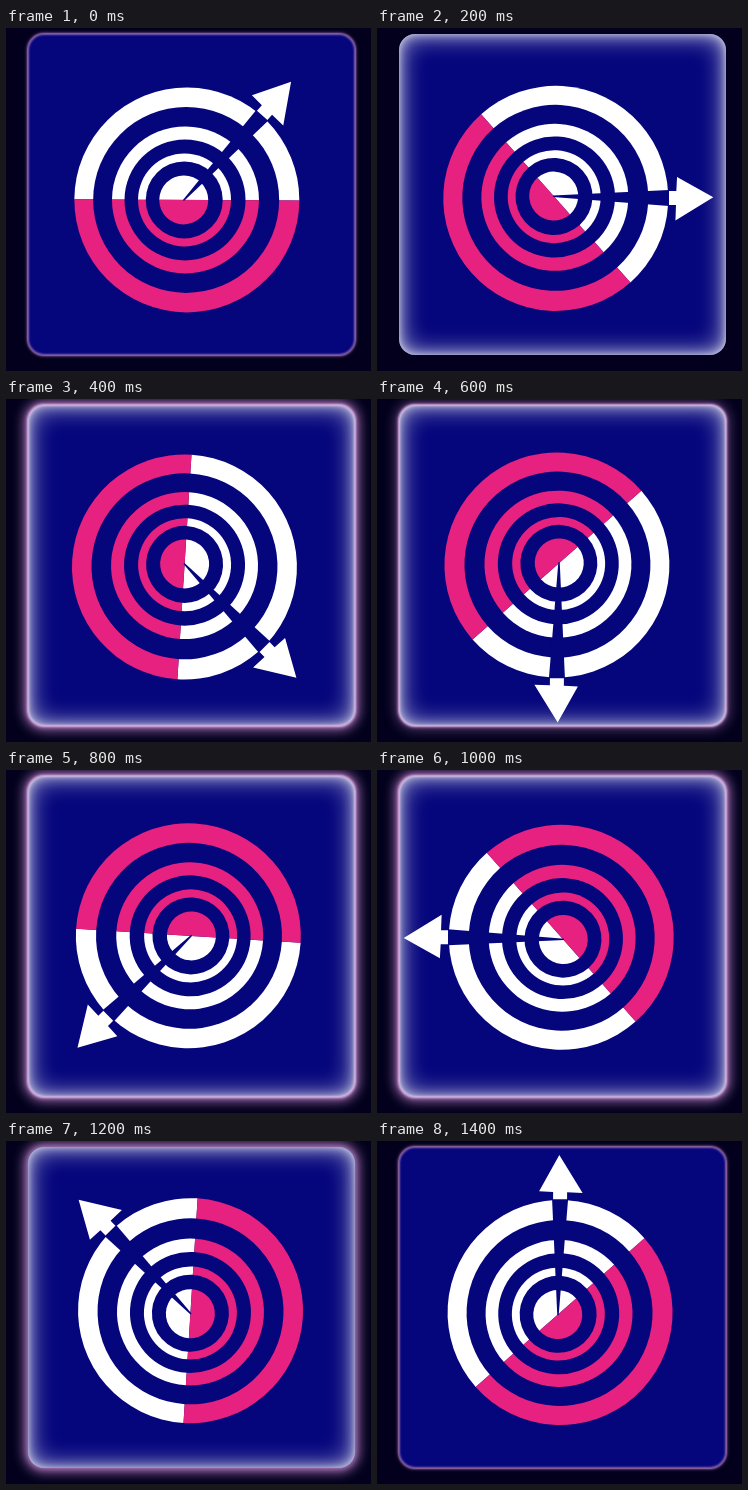
An HTML page with a canvas that plays this animation: 365 px wide and 343 px high, repeating every 1600 ms.

```html
<!DOCTYPE html>
<html lang="en">
<head>
<meta charset="utf-8">
<title>Spinning target</title>
<style>
  html, body { margin: 0; width: 100%; height: 100%; overflow: hidden; background: #02001c; }
  #card {
    position: absolute; left: 22px; top: 6px; width: 327px; height: 321px;
    border-radius: 16px; background: #05057c;
  }
  canvas { position: absolute; left: 0; top: 0; }
</style>
</head>
<body>
<div id="card"></div>
<canvas id="stage" width="365" height="343"></canvas>
<script>
const card = document.getElementById('card');
const ctx = document.getElementById('stage').getContext('2d');

const STEP = 200, STEPS = 8;
const NAVY = '#05057c', PINK = '#e6217f', WHITE = '#fff';
const RADII = [112.5, 93, 73.5, 60.5, 46.5, 38.5, 24.5];

const rad = deg => deg * Math.PI / 180;
const within = (i, first, last) => Number(i >= first && i <= last);

// An eighth of a turn per step, with a small overshoot that settles at once
const turnAt = i => 360 / STEPS * i + 3.3 * (1 - 0.05 ** i);

// The border blinks off, the inner glow holds, the outer glow flickers once
const lightAt = i => ({
  line: Number(i % 5 !== 1),
  inner: within(i, 1, 6),
  outer: within(i, 2, 6) * (i === 3 ? 0.5 : 1)
});

function polygon(color, points) {
  ctx.fillStyle = color;
  ctx.beginPath();
  points.forEach(([x, y]) => ctx.lineTo(x, y));
  ctx.fill();
}

// Smaller circles sit a little further off the pivot
function sector(color, r, from, sweep) {
  ctx.fillStyle = color;
  ctx.beginPath();
  ctx.arc(0.035 * r - 4.6, 3.1, r, rad(from), rad(from + sweep));
  ctx.fill();
}

function drawArrow() {
  polygon(NAVY, [[-5.5, -1.2], [110.5, -7], [118, -7], [118, 9], [110.5, 9], [-5.5, 0.2]]);
  polygon(WHITE, [
    [154.8, 0], [118.5, -20], [117.8, -6], [110.5, -6],
    [110.5, 8], [117.5, 8], [117, 23.5]
  ]);
}

function drawTarget(turn) {
  ctx.clearRect(0, 0, 365, 343);
  ctx.save();
  ctx.translate(181.5, 168.8);
  ctx.rotate(rad(turn));
  RADII.forEach((r, k) => {
    if (k % 2) {
      sector(NAVY, r, 0, 360);
    } else {
      sector(WHITE, r, 180.3, 180);
      sector(PINK, r, 0.3, 180);
    }
  });
  ctx.rotate(rad(-48));
  drawArrow();
  ctx.restore();
}

function lightCard({ line, inner, outer }) {
  const border = inner ? '232,192,234' : '186,134,200';
  card.style.boxShadow = [
    `inset 0 0 2px 1px rgba(${border},${0.7 * line})`,
    `inset 0 0 5px rgba(255,255,255,${0.4 * inner})`,
    `inset 0 0 12px 1px rgba(255,255,255,${0.5 * inner})`,
    `inset 0 0 26px 2px rgba(255,255,255,${0.6 * inner})`,
    `0 0 2px 1px rgba(${border},${0.85 * line})`,
    `0 0 4px 1px rgba(150,90,180,${0.4 * line})`,
    `0 0 5px 1px rgba(205,150,215,${0.5 * outer})`,
    `0 0 12px 4px rgba(190,130,205,${0.8 * outer})`
  ].join(',');
}

let shown = -1;
const start = performance.now();

function tick() {
  const i = Math.floor((performance.now() - start) / STEP) % STEPS;
  if (i !== shown) {
    drawTarget(turnAt(i));
    lightCard(lightAt(i));
    shown = i;
  }
  requestAnimationFrame(tick);
}
tick();
</script>
</body>
</html>
```
